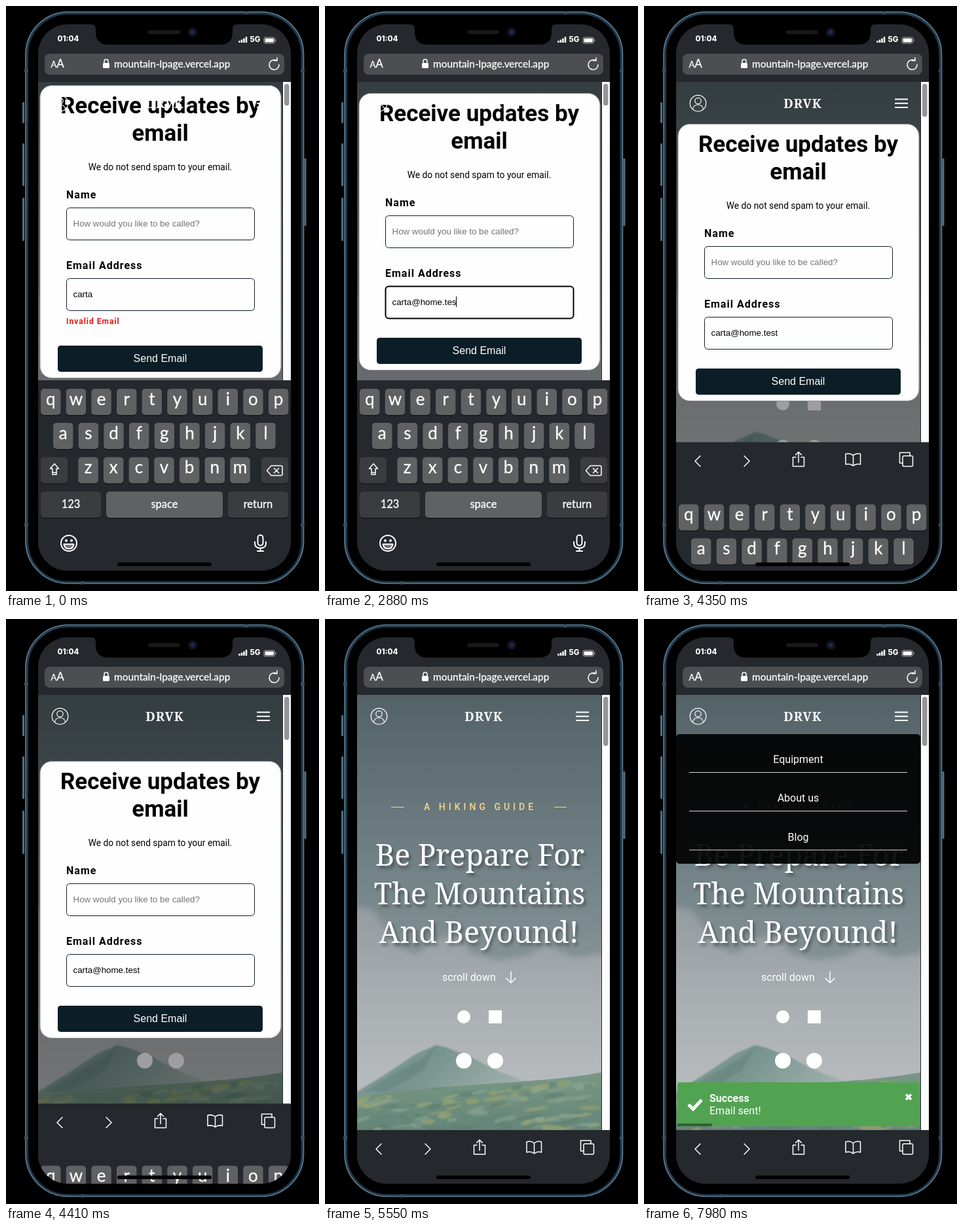
Animation of 478 by 894 pixels, one loop 8 s. Source, as an HTML page:

```html
<!DOCTYPE html>
<html lang="en">
<head>
<meta charset="utf-8">
<title>Email form on a phone</title>
<style>
  html, body { margin: 0; width: 100%; height: 100%; overflow: hidden; background: #000; }
  svg { display: block; }
  text { font-family: Roboto, sans-serif; fill: #fff; white-space: pre; }
  .mid { text-anchor: middle; }
  .ui text, .url { font-family: Lato, sans-serif; stroke: #fff; stroke-width: .3; }
  .status { font-family: Inter, sans-serif; font-weight: 800; }
  .arial { font-family: "Liberation Sans", Arial, sans-serif; }
  .line { fill: none; stroke: #fff; stroke-width: 1.5; stroke-linecap: round; stroke-linejoin: round; }
  .white { fill: #fff; }
  .bar { fill: #25282d; }
  .label { font-weight: 700; font-size: 16px; letter-spacing: 1px; fill: #000; }
  .title { font-weight: 700; font-size: 35px; fill: #000; }
  .hero { font-family: "Noto Serif", serif; font-size: 45px; filter: drop-shadow(3px 4px 2px rgba(0, 0, 0, .35)); }
  .input { fill: #fefefe; stroke: #0b1d26; }
</style>
</head>
<body>
<svg width="478" height="894" viewBox="0 0 478 894">
  <defs>
    <clipPath id="screen"><rect x="49" y="28" width="386" height="835" rx="45"/></clipPath>
    <clipPath id="heroBox"><rect x="49" y="116" width="373" height="666"/></clipPath>
    <linearGradient id="sky" x2="0" y2="1">
      <stop offset="0" stop-color="#536267"/><stop offset=".35" stop-color="#6e7e83"/>
      <stop offset=".6" stop-color="#839194"/><stop offset="1" stop-color="#9aa3a3"/>
    </linearGradient>
    <linearGradient id="cloud" x2="0" y2="1">
      <stop offset="0" stop-color="#929b9f"/><stop offset=".4" stop-color="#a9aeb1"/><stop offset="1" stop-color="#c0c3c4"/>
    </linearGradient>
    <linearGradient id="slope" x2="1" y2=".4">
      <stop offset="0" stop-color="#86a19b"/><stop offset=".45" stop-color="#76938d"/><stop offset="1" stop-color="#a0b0ad"/>
    </linearGradient>
    <linearGradient id="meadow" x2="0" y2="1">
      <stop offset="0" stop-color="#7a9885"/><stop offset="1" stop-color="#648579"/>
    </linearGradient>
    <filter id="soft"><feGaussianBlur stdDeviation="5"/></filter>
    <filter id="softer"><feGaussianBlur stdDeviation="1"/></filter>
    <clipPath id="meadowBox"><path d="M49 731Q130 718 210 713T310 706Q370 702 422 693V782H49z"/></clipPath>
  </defs>

  <!-- phone body -->
  <g fill="#526f82">
    <rect x="25" y="147" width="3" height="32" rx="1"/><rect x="25" y="210" width="3" height="65" rx="1"/>
    <rect x="25" y="293" width="3" height="66" rx="1"/><rect x="455.500" y="233" width="3" height="103" rx="1"/>
  </g>
  <rect x="32" y="11" width="420.500" height="870" rx="63" fill="#000" stroke="#20394a" stroke-width="4"/>
  <rect x="30" y="9" width="424.500" height="873.500" rx="65" fill="none" stroke="#5d7f95" stroke-width="1.600"/>
  <path d="M28 99h6M28 793h6M450 99h6M450 793h6M367 8v5M117 879v5" stroke="#33505f" stroke-width="5"/>

  <g clip-path="url(#screen)">
    <rect class="bar" x="49" y="28" width="386" height="835"/>

    <!-- landing page -->
    <g clip-path="url(#heroBox)">
      <rect x="49" y="116" width="373" height="666" fill="url(#sky)"/>
      <path filter="url(#soft)" fill="url(#cloud)" d="M30 437L72 444 92 470 106 500 140 512 168 490 200 482 222 510 262 522 304 516 338 500 382 518 440 508V800H30z"/>
      <path filter="url(#softer)" fill="url(#slope)" d="M40 728L95 694 140 664 170 651 186 655 222 669 262 690 310 708V760H40z"/>
      <path filter="url(#softer)" fill="#56766f" opacity=".3" d="M170 652L150 670 110 692 60 722H95L150 690z"/>
      <g clip-path="url(#meadowBox)">
        <rect x="49" y="690" width="373" height="92" fill="url(#meadow)"/>
        <g id="grass" filter="url(#softer)"></g>
      </g>
    </g>
    <path d="M101 287.5h20M350 287.5h19" stroke="#fbd784"/>
    <text x="151" y="292" font-size="14" font-weight="500" letter-spacing="5" style="fill:#fbd784">A HIKING GUIDE</text>
    <g class="mid">
      <text class="hero" x="236.500" y="377">Be Prepare For</text>
      <text class="hero" x="236" y="436">The Mountains</text>
      <text class="hero" x="235" y="495">And Beyound!</text>
    </g>
    <text x="179" y="553" font-size="16">scroll down</text>
    <path class="line" d="M284 539v16.500M277 549l7 7 7-7"/>
    <g class="white">
      <circle cx="212" cy="608" r="10"/><rect x="250" y="598" width="20" height="20"/>
      <circle cx="212" cy="675" r="12"/><circle cx="260" cy="675" r="12"/>
    </g>

    <!-- modal form -->
    <g id="modal">
      <rect x="49" y="116" width="373" height="666" opacity=".38"/>
      <g id="card">
        <rect id="sheet" x="52" y=".5" width="368" height="423" rx="18" fill="#fefefe" stroke="#8d9295"/>
        <g class="mid">
          <text class="title" x="235.5" y="43">Receive updates by</text>
          <text class="title" x="235.5" y="85">email</text>
          <text x="235.5" y="130" font-size="13.8" style="fill:#000">We do not send spam to your email.</text>
        </g>
        <text class="label" x="92" y="173">Name</text>
        <rect class="input" x="92.500" y="187.500" width="287" height="49" rx="5"/>
        <text class="arial" x="102.500" y="216" font-size="13.33" style="fill:#757575">How would you like to be called?</text>
        <text class="label" x="92" y="281">Email Address</text>
        <rect id="field" class="input" x="92.500" y="295.500" width="287" height="49" rx="5"/>
        <text id="typed" class="arial" x="102.500" y="323.500" font-size="13.33" style="fill:#000"></text>
        <rect id="caret" y="311" width="1" height="16"/>
        <text id="error" x="92" y="365" font-size="12" font-weight="700" letter-spacing="1" style="fill:#f01414">Invalid Email</text>
        <g id="send">
          <rect x="79" width="313" height="40" rx="4.500" fill="#0b1d26"/>
          <text class="arial mid" x="235.500" y="24.500" font-size="16">Send Email</text>
        </g>
      </g>
    </g>

    <!-- navigation -->
    <g class="line" style="stroke-width:1.2">
      <circle cx="82.500" cy="148.700" r="12.300"/><circle cx="82.500" cy="145" r="4.700"/>
      <path d="M74.500 157.500q1-6.500 8-6.500t8 6.500"/>
    </g>
    <text class="mid" x="242.500" y="156" font-size="19" font-weight="700" letter-spacing="1" style="font-family:'Noto Serif',serif">DRVK</text>
    <path d="M383 142.500h20M383 148.800h20M383 155h20" stroke="#fff" stroke-width="2"/>

    <g id="menu">
      <rect x="49" y="176" width="373" height="198" rx="5" opacity=".92"/>
      <g class="mid" font-size="16">
        <text x="235.500" y="220">Equipment</text><text x="235.500" y="279">About us</text><text x="235.500" y="339">Blog</text>
      </g>
      <path d="M69 234.500h333M69 293.500h333M69 353h333" stroke="#d8d8d8"/>
    </g>

    <g id="toast">
      <rect x="51" y="708" width="370" height="67" rx="3" fill="#51a351"/>
      <path d="M68 742l7 7 13-14" fill="none" stroke="#fff" stroke-width="5"/>
      <text x="100" y="738" font-size="16" font-weight="700">Success</text>
      <text x="100" y="757" font-size="16">Email sent!</text>
      <path d="M400 726.500l8 8M408 726.500l-8 8" stroke="#fff" stroke-width="3.800"/>
      <rect id="progress" x="51" y="771" height="4" fill="#316231"/>
    </g>

    <rect x="422" y="116" width="1" height="666" fill="#1c2a31"/>
    <rect x="423" y="116" width="12" height="666" fill="#fdfdfd"/>
    <rect id="thumb" x="425" y="119" width="7.500" rx="3.700" fill="#959595"/>

    <!-- browser toolbar, its top edge at zero -->
    <g id="toolbar">
      <rect class="bar" x="49" width="386" height="400"/>
      <g class="line">
        <path d="M86 21l-8 8 8 8M153 21l8 8-8 8"/>
        <path d="M232 23h-4.500v14h17V23H240M236 31V15.500M231.500 19.500l4.500-4.500 4.500 4.500"/>
        <path d="M319.500 20q-5-4-11.500-2v16q6.500-2 11.500 2 5-4 11-2V18q-6-2-11 2zv16"/>
        <rect x="395" y="21" width="15.500" height="16" rx="2"/><path d="M395 32h-4.500V16H406v5"/>
      </g>
    </g>

    <!-- keyboard -->
    <g id="keyboard" class="ui">
      <rect class="bar" x="49" y="572" width="386" height="300"/>
      <g id="keys" class="mid"></g>
      <path class="line" d="M74 699.500l-6.500 7.500h3.500v9h6v-9h3.500zM71 713h6"/>
      <path class="line" stroke-width="2" d="M398.500 710l6.500-7.500h15q2 0 2 2v11q0 2-2 2h-15zM409.500 706.500l7 7M416.500 706.500l-7 7"/>
      <g class="line" style="stroke-width:2">
        <circle cx="96" cy="821" r="12"/><path class="white" d="M88.500 822.500h15q-1 7-7.500 7t-7.500-7z" fill-opacity=".35"/>
        <rect x="384.500" y="808.500" width="8" height="16" rx="4"/><path d="M380 819v2q0 7.500 8.500 7.500t8.500-7.500v-2M388.500 829v4M384 833h9"/>
      </g>
      <circle class="white" cx="92" cy="817" r="2"/><circle class="white" cx="100" cy="817" r="2"/>
    </g>
    <rect x="170" y="850.500" width="144" height="5.500" rx="2.700"/>

    <!-- status and address bar -->
    <path d="M130 28q7 0 7 7v5q0 19 19 19h171q19 0 19-19v-5q0-7 7-7z"/>
    <rect x="217" y="37" width="49" height="6" rx="3" fill="#191919"/>
    <circle cx="285" cy="40" r="7" fill="#11151f"/><circle cx="285" cy="40" r="3" fill="#1d2c55"/>
    <text class="status" x="78.500" y="54" font-size="11.500">01:04</text>
    <text class="status" x="372.500" y="55" font-size="11.500">5G</text>
    <path d="M356.500 56v-3M360 56v-4.500M363.500 56v-6.500M367 56v-9" stroke="#fff" stroke-width="2.500"/>
    <rect x="394" y="48" width="16.500" height="9" rx="2" fill="none" stroke="#aaa"/><rect class="white" x="395.500" y="49.500" width="13.500" height="6" rx="1"/>
    <path d="M412 51v3" stroke="#aaa"/>
    <rect x="59" y="73" width="366" height="32" rx="8" fill="#4c4e51"/>
    <text class="url" x="68.500" y="94" font-size="13">A<tspan font-size="17">A</tspan></text>
    <rect class="white" x="148" y="87" width="10" height="8" rx="1.500"/>
    <path class="line" d="M150 87v-2.500q0-3 3-3t3 3V87"/>
    <text class="url" x="165" y="94" font-size="15.400">mountain-lpage.vercel.app</text>
    <path class="line" d="M413.500 83.500a7.500 7.500 0 1 0 3.500 6M409.500 83.500h4.500v-4.500"/>
  </g>
</svg>
<script>
const $ = id => document.getElementById(id);
const clamp = v => Math.min(1, Math.max(0, v));
const show = (id, on) => $(id).setAttribute('display', on ? 'inline' : 'none');
const set = (id, name, value) => $(id).setAttribute(name, value);
const moveY = (id, y) => set(id, 'transform', `translate(0 ${y})`);

// keyboard
function key(x, y, width, label, size, fill = '#606163') {
  return `<rect x="${x}" y="${y + 1.5}" width="${width}" height="40" rx="5" fill="#15171a"/>
    <rect x="${x}" y="${y}" width="${width}" height="40" rx="5" fill="${fill}"/>
    <text x="${x + width / 2}" y="${y + 24.5}" font-size="${size}">${label}</text>`;
}
const dark = '#3a3c3f';
const letters = [['qwertyuiop', 53, 585], ['asdfghjkl', 72, 637], ['zxcvbnm', 110.3, 689.5]];
$('keys').innerHTML = letters.map(([row, x, y]) =>
  [...row].map((c, i) => key(x + i * 38.65, y, 30.5, c, 26)).join('')).join('') +
  key(53, 689.5, 41, '', 16, dark) + key(390, 689.5, 41, '', 16, dark) +
  key(53, 742, 92, '123', 16.5, dark) + key(153, 742, 178, 'space', 16.5) + key(339, 742, 92, 'return', 16.5, dark);

// meadow patches
let seed = 11;
const random = () => (seed = seed * 16807 % 2147483647) / 2147483647;
const tints = ['#9ba66b', '#5c7f72', '#90a998', '#a2aa70', '#63857a', '#87a08f'];
$('grass').innerHTML = Array.from({ length: 110 }, (_, i) => {
  const x = 49 + random() * 373, y = 704 + random() * 78;
  return `<ellipse rx="${6 + random() * 16}" ry="${1.5 + random() * 3}" fill="${tints[i % 6]}" opacity=".6"
    transform="translate(${x} ${y}) rotate(${-20 + random() * 25})"/>`;
}).join('');

const email = 'carta@home.test';
const focusAt = 540, validAt = 2760, blurAt = 4290, sentAt = 5550, menuAt = 7400;
const keyTimes = [1260, 1860, 2040, 2100, 2190, 2430, 2610, 2760, 2880, 2910];

function draw(t) {
  // the page grows while the keyboard slides away under the toolbar
  const closing = t >= blurAt;
  const keyboardHeight = 291 * (1 - clamp((t - 4263) / 236)) ** 2;
  const pageBottom = closing ? 781 - keyboardHeight : 572;
  const pageHeight = pageBottom - 116;
  show('toolbar', closing);
  moveY('toolbar', pageBottom);
  moveY('keyboard', closing ? pageBottom + 82 - 572 : 0);
  set('thumb', 'height', pageHeight ** 2 / 5600 - 4);

  const invalid = t < validAt, focused = t >= focusAt && !closing;
  const height = invalid ? 447 : 423;
  show('modal', t < sentAt);
  moveY('card', Math.round(116 + (pageHeight - height) / 2));
  set('sheet', 'height', height);
  moveY('send', height - 49);
  show('error', invalid);
  set('field', 'style', focused ? 'stroke:#000;stroke-width:2' : '');

  const pressed = keyTimes.filter(k => k <= t);
  const lastInput = pressed.length ? pressed[pressed.length - 1] : focusAt;
  $('typed').textContent = email.slice(0, 5 + pressed.length);
  show('caret', focused && (t - lastInput) % 1020 < 510);
  if (t < sentAt) set('caret', 'x', Math.round(102.5 + $('typed').getComputedTextLength()));

  set('toast', 'opacity', clamp((t - sentAt - 30) / 300));
  set('progress', 'width', 369 * clamp(1 - (t - sentAt) / 2838));
  set('menu', 'opacity', clamp((t - menuAt) / 200));
}

const start = performance.now();
function tick() {
  draw((performance.now() - start) % 8000);
  requestAnimationFrame(tick);
}
tick();
</script>
</body>
</html>
```
